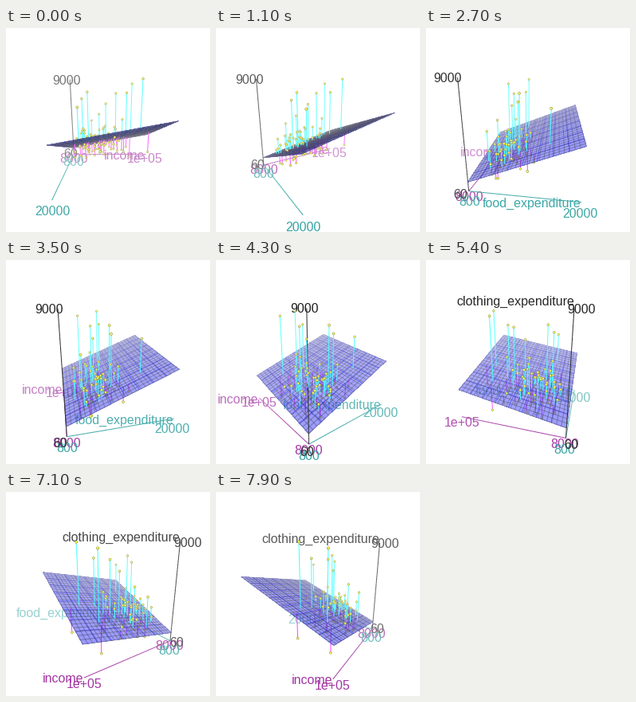
A matplotlib script for the animation above (8 s loop, 256x256 px).

```python
import numpy as np
import matplotlib.pyplot as plt
from matplotlib.animation import FuncAnimation
from matplotlib.collections import LineCollection, PolyCollection

SIZE, DPI = 256, 64
PX = 72 / DPI
FRAMES, STEP = 80, 3
CENTRE, DIST, FAR = 0.475, 1.88, 2.82
FOCAL = SIZE / 2 / np.tan(np.pi / 6)
PHI = np.radians(15)

MAGENTA, BLACK, TEAL = (0.545, 0, 0.545), (0, 0, 0), (0, 0.545, 0.545)
YELLOW, OLIVE, BLUE = (1, 1, 0), (0.42, 0.42, 0), (0, 0, 1)


def plane(x, z):
    return 0.094 + 0.191 * x + 0.4 * z


def make_points(n=98):
    """A skewed cloud around the plane with a few strong outliers."""
    rng = np.random.default_rng(7)
    x = 0.06 + 0.7 * rng.beta(1.8, 2.4, n)
    z = 0.08 + 0.55 * rng.beta(1.8, 2.5, n)
    y = plane(x, z) + rng.gamma(2.2, 0.09, n) - 0.2
    cloud = np.column_stack([x, np.maximum(y, 0.02), z])
    outliers = [(.83, 1, .43), (.75, .95, .2), (.67, .86, .42),
                (.26, .87, .43), (.2, .8, .43), (.2, .75, .72),
                (.75, .03, .16), (.93, .19, .39)]
    return np.vstack([outliers, cloud])


POINTS = make_points()
FEET = POINTS.copy()
FEET[:, 1] = plane(POINTS[:, 0], POINTS[:, 2])
ABOVE = POINTS[:, 1] > FEET[:, 1]

UNIT_X, UNIT_Y, UNIT_Z = np.eye(3)
# direction, name, lowest and highest value, colour, offsets of name and values
AXES = [
    (UNIT_X, "income", "8000", "1e+05", MAGENTA, 0 * UNIT_Y, -0.05 * UNIT_Y),
    (UNIT_Z, "food_expenditure", "800", "20000", TEAL,
     0 * UNIT_Y, -0.1 * UNIT_Y),
    (UNIT_Y, "clothing_expenditure", "60", "9000", BLACK,
     0.05 * UNIT_Y, -0.05 * (UNIT_X + UNIT_Z)),
]


def is_above(p):
    return p[..., 1] > plane(p[..., 0], p[..., 2])


def on_plane(x, z):
    x, z = np.broadcast_arrays(x, z)
    return np.stack([x, plane(x, z), z], axis=-1)


def pieces(p, q, n):
    """Cut a segment into n short ones."""
    t = np.linspace(0, 1, n + 1)[:, None]
    pts = p * (1 - t) + q * t
    return np.stack([pts[:-1], pts[1:]], axis=1)


def build_grid(lines=26, cuts=5):
    segs = []
    for v in np.linspace(0, 1, lines):
        segs.append(pieces(on_plane(0, v), on_plane(1, v), cuts))
        segs.append(pieces(on_plane(v, 0), on_plane(v, 1), cuts))
    return np.concatenate(segs)


def build_quads(n=8):
    i, j = np.divmod(np.arange(n * n), n)
    dx, dz = np.array([0, 1, 1, 0]), np.array([0, 0, 1, 1])
    return on_plane((i[:, None] + dx) / n, (j[:, None] + dz) / n)


GRID = build_grid()
QUADS = build_quads()


def project(p, a):
    """Screen positions and depths of points seen from azimuth a."""
    x, y, z = np.moveaxis(p - CENTRE, -1, 0)
    side = x * np.cos(a) - z * np.sin(a)
    near = x * np.sin(a) + z * np.cos(a)
    depth = DIST - near * np.cos(PHI) - y * np.sin(PHI)
    up = y * np.cos(PHI) - near * np.sin(PHI)
    k = FOCAL / depth
    return np.stack([128 + k * side, 128 - k * up], axis=-1), depth


def fog(colour, depth):
    f = np.exp(-(depth / FAR) ** 2)[..., None]
    return np.asarray(colour) * f + (1 - f)


fig = plt.figure(figsize=(SIZE / DPI, SIZE / DPI), dpi=DPI, facecolor="white")
ax = fig.add_axes([0, 0, 1, 1])


def add_lines(segs, colour, a, order, alpha=1):
    xy, d = project(segs, a)
    ax.add_collection(LineCollection(
        xy, colors=fog(colour, d.mean(axis=1)), linewidths=PX,
        alpha=alpha, zorder=order))


def add_label(text, pos, colour, align, a, order):
    (x, y), d = project(pos, a)
    label = ax.text(x - 0.6, y + 6.3, text, color=fog(colour, d), ha=align,
                    va="baseline", fontsize=16 * PX,
                    family="Liberation Sans", zorder=order)
    # a label that would start off stage is dropped
    if label.get_window_extent(fig.canvas.get_renderer()).x0 < 0:
        label.remove()


def add_axes(a, above, order):
    for end, name, low, high, colour, name_off, value_off in AXES:
        for text, pos, align in ((name, end + name_off, "right"),
                                 (low, value_off, "center"),
                                 (high, end + value_off, "center")):
            if is_above(pos) == above:
                add_label(text, pos, colour, align, a, order)
        segs = pieces(0 * end, end, 32)
        segs = segs[is_above(segs.mean(axis=1)) == above]
        if len(segs):
            add_lines(segs, colour, a, order + 1)


def add_side(a, above, order):
    """Everything on one side of the plane."""
    add_axes(a, above, order)
    pick = ABOVE == above
    stems = np.stack([FEET[pick], POINTS[pick]], axis=1)
    add_lines(stems, (0, 1, 1) if above else (1, 0, 1), a, order + 2)

    xy, d = project(POINTS[pick], a)
    far_first = np.argsort(-d)
    xy, d = xy[far_first], d[far_first]
    size = 2 * 0.0103 * FOCAL / d * PX
    ax.scatter(*xy.T, s=size ** 2, c=fog(YELLOW, d),
               edgecolors=fog(OLIVE, d), linewidths=0.6 * PX, zorder=order + 3)
    ax.scatter(*(xy - 0.4).T, s=(size * 0.35) ** 2, c="#ffffb0",
               linewidths=0, zorder=order + 4)


def add_plane(a, order):
    xy, d = project(QUADS, a)
    ax.add_collection(PolyCollection(
        xy, facecolors=fog(BLUE, d.mean(axis=1)), edgecolors="none",
        alpha=0.5, antialiaseds=False, zorder=order))
    add_lines(GRID, BLACK, a, order + 1, 0.4)


def draw(k):
    ax.clear()
    ax.set(xlim=(0, SIZE), ylim=(SIZE, 0))
    ax.axis("off")
    a = np.radians(-STEP * k)
    eye = CENTRE + DIST * np.array([np.sin(a) * np.cos(PHI), np.sin(PHI),
                                    np.cos(a) * np.cos(PHI)])
    eye_above = is_above(eye)
    add_side(a, not eye_above, 1)
    add_plane(a, 10)
    add_side(a, eye_above, 20)
    return []


anim = FuncAnimation(fig, draw, frames=FRAMES, interval=100,
                     init_func=lambda: [], repeat=True, repeat_delay=0)
plt.show()
```
